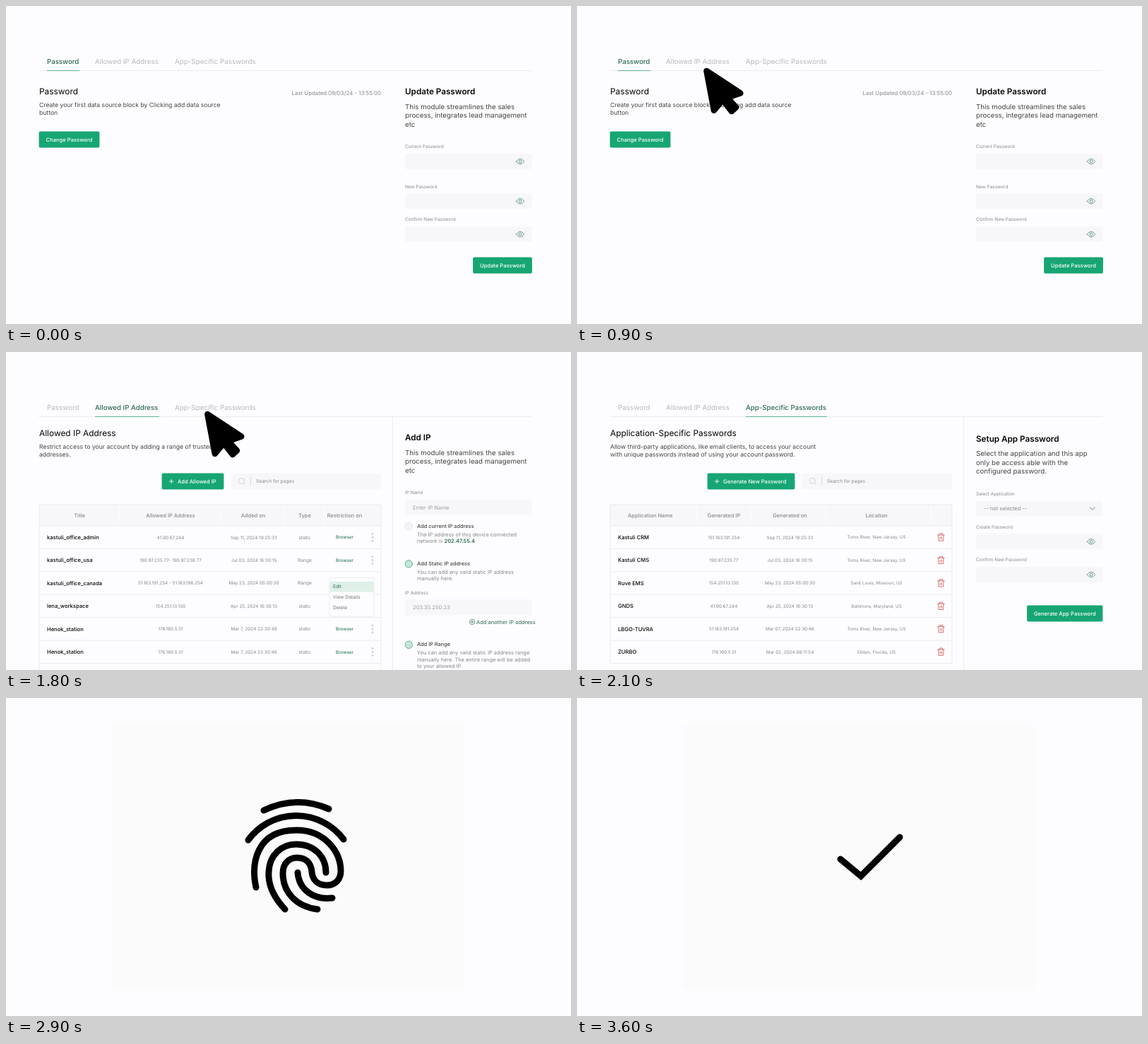
Recreate the animation shown at these times as an HTML page. Size 800 by 450 pixels, loop 4.2 s.

```html
<!DOCTYPE html>
<html lang="en">
<head>
<meta charset="utf-8">
<title>Password settings</title>
<style>
html, body { margin: 0; width: 100%; height: 100%; overflow: hidden; background: #fdfcfe; }
svg { display: block; width: 800px; height: 450px; }
text { font-family: Inter, "Open Sans", sans-serif; text-rendering: geometricPrecision; white-space: pre; }
.ink { fill: none; stroke: #000; stroke-width: 9; stroke-linecap: round; }
</style>
</head>
<body>
<svg id="stage" viewBox="0 0 800 450"></svg>
<script>
const GREEN = '#17a673', DEEP = '#2d6a54', DARK = '#060606', BODY = '#444', MUTE = '#85888c', FIELD = '#f7f6f9', LINE = '#ebeaee';

// Text is placed by the middle of its capitals.
const text = (x, y, s, size, fill = BODY, weight = 400, anchor = 'start') =>
  `<text x="${x}" y="${(y + size * 0.36).toFixed(2)}" font-size="${size}" fill="${fill}" font-weight="${weight}" text-anchor="${anchor}">${s}</text>`;
const mid = (x, y, s, size = 6.4, fill = MUTE, weight = 400) => text(x, y, s, size, fill, weight, 'middle');
const lines = (x, y, step, list, size, fill) => list.map((s, i) => text(x, y + i * step, s, size, fill)).join('');
const rect = (x, y, w, h, fill, r = 0, stroke = 'none') =>
  `<rect x="${x}" y="${y}" width="${w}" height="${h}" rx="${r}" fill="${fill}" stroke="${stroke}"/>`;
const path = (d, stroke, width = 1, fill = 'none') =>
  `<path d="${d}" fill="${fill}" stroke="${stroke}" stroke-width="${width}" stroke-linecap="round" stroke-linejoin="round"/>`;
const dot = (x, y, r, fill, stroke = 'none', width = 1) =>
  `<circle cx="${x}" cy="${y}" r="${r}" fill="${fill}" stroke="${stroke}" stroke-width="${width}"/>`;

const tabs = active => path('M47 91.5H744', LINE) +
  [['Password', 58, 46], ['Allowed IP Address', 126, 91], ['App-Specific Passwords', 239, 115]].map(([s, x, w], i) =>
    i === active ? text(x, 78.3, s, 9.68, DEEP, 500) + rect(x, 91, w, 1, '#5fb394')
                 : text(x, 78.3, s, 9.85, '#b9b9bd')).join('');

const button = (x, y, w, s, plus) => rect(x - 0.4, y - 0.4, w + 0.8, 22.8, GREEN, 2) +
  (plus ? path(`M${x + 10.5} ${y + 11}h5.4m-2.7 -2.7v5.4`, '#fff', 0.9) + text(x + 22, y + 11, s, 7.6, '#fff', 500)
        : mid(x + w / 2, y + 11, s, 7.6, '#fff', 500));

const eye = (x, y) => path(`M${x - 5.6} ${y}Q${x} ${y - 8} ${x + 5.6} ${y}Q${x} ${y + 8} ${x - 5.6} ${y}Z`, '#5d9482', 0.9) +
  dot(x, y, 1.9, 'none', '#5d9482', 0.9);
const field = (label, y, inner = '') => text(565, y - 10, label, 6.45, MUTE) + rect(565, y, 179.5, 22, FIELD, 2) + inner;
const secret = (label, y) => field(label, y, eye(728, y + 11));

const side = (title, y, para) => text(565, y, title, 11.7, DARK, 600) + lines(565, y + 21.5, 12.3, para, 9.7, BODY);
const about = ['This module streamlines the sales', 'process, integrates lead management', 'etc'];

const search = rect(318.5, 172, 212.5, 22, FIELD, 2) + dot(333.5, 182.5, 4, 'none', '#c9c9ce', 0.8) +
  path('M336.5 185.5l2 2M346.5 177v12', '#d4d4d8', 0.8) + text(354, 183, 'Search for pages', 6.66, MUTE);

const ROW = 32.42, rowY = i => 262.2 + i * ROW;
function table(heads, seps, rows, cell, bottom) {
  let out = rect(47, 216, 484, 30, FIELD);
  out += heads.map(([s, x]) => mid(x, 231, s, 7.5, MUTE, 500)).join('');
  out += seps.map(x => path(`M${x} 217V245`, '#fdfcfe')).join('');
  for (let i = 0; i < 7; i++) out += path(`M47 ${246 + i * ROW}H531`, LINE);
  out += path(`M47 ${bottom}V216H531V${bottom}`, LINE);
  return out + rows.map((r, i) => text(58, rowY(i), r[0], 7.6, DARK, 500) + cell(r, rowY(i), i)).join('');
}

const divider = path('M547.5 92V450', LINE);

const passwordPage = tabs(0) + text(47, 121, 'Password', 11.9, DARK) +
  lines(47, 140, 11, ['Create your first data source block by Clicking add data source', 'button'], 8.62, BODY) +
  text(531, 122.8, 'Last Updated 09/03/24 - 13:55:00', 7.85, MUTE, 400, 'end') +
  button(47, 178, 85, 'Change Password') + side('Update Password', 121, about) +
  secret('Current Password', 209) + secret('New Password', 265.2) + secret('Confirm New Password', 312) +
  button(661.5, 356, 83, 'Update Password');

const kebab = y => [-5, 0, 5].map(d => dot(519, y + d, 1.5, '#d3d3d7')).join('');
const menu = rect(458, 319.5, 63, 54.5, '#fdfcfe', 2, LINE) + rect(458.5, 325, 62, 14.5, '#dff0e9') +
  text(463, 332, 'Edit', 6.7, DEEP) + text(463, 347, 'View Details', 6.7, '#777') + text(463, 362, 'Delete', 6.7, '#777');

const radio = (y, on, title, note) =>
  dot(570.3, y + 0.8, 5.2, on ? '#c5e6da' : '#f4f4f6', on ? '#58a58a' : '#e2e2e6', 0.9) +
  text(582, y, title, 7.35, '#444', 500) + lines(582, y + 12, 9.4, note, 7.43, MUTE);

const ipPage = tabs(1) + divider + text(47, 115, 'Allowed IP Address', 11.9, DARK) +
  lines(47, 133.7, 11, ['Restrict access to your account by adding a range of trusted IP', 'addresses.'], 8.62, BODY) +
  button(221, 172, 87, 'Add Allowed IP', true) + search +
  table([['Title', 104], ['Allowed IP Address', 233], ['Added on', 350], ['Type', 423], ['Restriction on', 479.5]],
    [161, 305, 394, 451], [
      ['kastuli_office_admin', '41.90.67.244', 'Sep 11, 2024 19:25:33', 'static'],
      ['kastuli_office_usa', '190.97.235.77- 190.97.238.77', 'Jul 03, 2024 16:30:15', 'Range'],
      ['kastuli_office_canada', '51.163.191.254 - 51.163.196.254', 'May 23, 2024 05:00:30', 'Range'],
      ['lena_workspace', '154.251.13.130', 'Apr 25, 2024 16:30:13', 'static'],
      ['Henok_station', '176.160.5.31', 'Mar 7, 2024 22:30:46', 'static'],
      ['Henok_station', '176.160.5.31', 'Mar 7, 2024 22:30:46', 'static']
    ], (r, y) => mid(233, y, r[1]) + mid(351, y, r[2]) + mid(423, y, r[3], 6.7) +
      mid(479.5, y, 'Browser', 6.3, '#2f7d60', 500) + kebab(y), 450) + menu +
  side('Add IP', 121, about) +
  field('IP Name', 209, text(576, 220, 'Enter IP Name', 7.7, '#a0a0a5')) +
  radio(246, false, 'Add current IP address', ['The IP address of this device connected',
    `network is <tspan fill="${DEEP}" font-weight="600">202.47.55.4</tspan>`]) +
  radio(299, true, 'Add Static IP address', ['You can add any valid static IP address', 'manually here.']) +
  field('IP Address', 350.5, text(576, 361, '203.35.250.23', 7.67, '#a0a0a5')) +
  dot(660, 382, 3.6, 'none', DEEP, 0.7) + path('M658.2 382h3.6m-1.8 -1.8v3.6', DEEP, 0.7) +
  text(666, 382, 'Add another IP address', 7.57, DEEP) +
  radio(413.5, true, 'Add IP Range', ['You can add any valid static IP address range',
    'manually here. The entire range will be added', 'to your allowed IP.']);

const bin = y => path(`M510.7 ${y - 3.2}h9.4M513.3 ${y - 3.4}v-1.9h4.2v1.9M511.7 ${y - 3}l.4 8h6.6l.4 -8M514.3 ${y - .4}v3m2.2 -3v3`, '#d4605f', 0.9);

const appPage = tabs(2) + divider + text(47, 115, 'Application-Specific Passwords', 11.9, DARK) +
  lines(47, 133.7, 11, ['Allow third-party applications, like email clients, to access your account',
    'with unique passwords instead of using your account password.'], 8.62, BODY) +
  button(185, 172, 123, 'Generate New Password', true) + search +
  table([['Application Name', 103.7], ['Generated IP', 208], ['Generated on', 301.5], ['Location', 424]],
    [169, 246, 352, 501], [
      ['Kastuli CRM', '151.163.191.254', 'Sep 11, 2024 19:25:33', 'Toms River, New Jersey, US'],
      ['Kastuli CMS', '190.97.235.77', 'Jul 03, 2024 16:30:15', 'Toms River, New Jersey, US'],
      ['Ruve EMS', '154.251.13.130', 'May 23, 2024 05:00:30', 'Saint Louis, Missouri, US'],
      ['GNDS', '41.90.67.244', 'Apr 25, 2024 16:30:13', 'Baltimore, Maryland, US'],
      ['LBGO-TUVRA', '51.163.191.254', 'Mar 07, 2024 22:30:46', 'Toms River, New Jersey, US'],
      ['ZURBO', '176.160.5.31', 'Mar 02, 2024 08:11:54', 'Elkton, Florida, US']
    ], (r, y) => mid(208, y, r[1]) + mid(301.5, y, r[2]) + mid(424, y, r[3], 6.25) + bin(y), 440.5) +
  side('Setup App Password', 122.5, ['Select the application and this app', 'only be access able with the', 'configured password.']) +
  field('Select Application', 210.7, text(576, 221.5, '-- not selected --', 7.45, MUTE) + path('M726.3 219.7l3.6 3.6 3.6 -3.6', '#5d9482')) +
  secret('Create Password', 257.3) + secret('Confirm New Password', 304) +
  button(637.5, 359, 106.5, 'Generate App Password');

const ridges = [
  'M365 159Q411 137 457 157',
  'M343 201A84 84 0 0 1 478 200',
  'M354 268C347 236 353 187 411 187C452 187 474 218 474 245C474 257 466 265 454 265C441 265 434 257 433 246C432 233 424 226 412 226C400 226 392 235 392 248C392 274 410 295 441 299',
  'M395 299C378 281 371 262 372 246C373 222 390 207 411 207C436 207 453 224 453 247',
  'M413 247C415 272 436 286 462 283'
];
const stroke = d => `<path class="ink" pathLength="1" d="${d}"/>`;
const scanPage = rect(150, 38, 499.5, 374, '#fcfbfb') + ridges.map(stroke).join('') + stroke('M373 228L402 252L457 197');

const stage = document.getElementById('stage');
stage.innerHTML = [passwordPage, ipPage, appPage, scanPage].map(p => `<g class="page">${p}</g>`).join('') +
  `<g id="cursor">${path('M4.5 4.5L52.5 36L34 42.5L46.3 56L40 61.7L27.5 45.5L15 60.5Z', '#000', 8.4, '#000')}</g>`;
const pages = stage.querySelectorAll('.page');
const inks = [...stage.querySelectorAll('.ink')];
const cursor = document.getElementById('cursor');

const LOOP = 4200, STEP = 100;
const starts = [0, 1000, 2000, 2600];
// Each leg: start, end, from point, to point.
const legs = [[0, 963, [360, 452], [177, 83.5]], [1200, 1800, [177, 83.5], [280.8, 83.5]]];
const part = (t, a, b) => Math.min(1, Math.max(0, (t - a) / (b - a)));
const ease = u => (1 - Math.cos(Math.PI * u)) / 2;

function reveal(el, from, to) {
  const len = to - from;
  el.style.visibility = len > 0.001 ? 'inherit' : 'hidden';
  el.style.strokeDasharray = len > 0.999 ? 'none' : `0 ${from} ${len} 2`;
}

function draw(t) {
  const page = starts.filter(s => t >= s).length - 1;
  pages.forEach((p, i) => p.style.visibility = i === page ? 'visible' : 'hidden');
  const [a, b, p, q] = legs[t < 1200 ? 0 : 1];
  const k = ease(part(t, a, b));
  cursor.setAttribute('transform', `translate(${p[0] + (q[0] - p[0]) * k} ${p[1] + (q[1] - p[1]) * k})`);
  cursor.style.visibility = t < 2000 ? 'visible' : 'hidden';
  inks.forEach((el, i) => {
    if (i < ridges.length) reveal(el, part(t, 3000, 3100 + 40 * i), part(t, 2500, 2900));
    else reveal(el, 0, part(t, 3200, 3600));
  });
}

const begin = performance.now();
function tick() {
  const t = (performance.now() - begin) % LOOP;
  draw(Math.floor(t / STEP) * STEP);
  requestAnimationFrame(tick);
}
draw(0);
requestAnimationFrame(tick);
</script>
</body>
</html>
```
